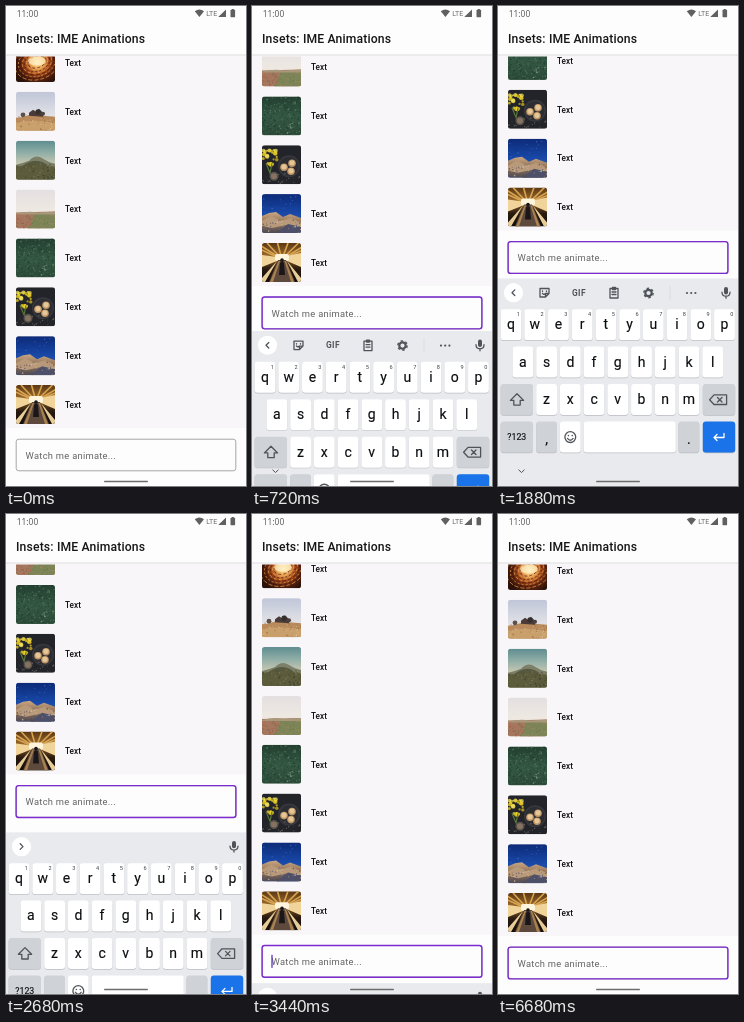
An HTML page that plays this animation: 240 px wide and 480 px high, repeating every 7000 ms.

```html
<!DOCTYPE html>
<html lang="en">
<head>
<meta charset="utf-8">
<title>Insets: IME Animations</title>
<style>
  html, body { margin: 0; width: 100%; height: 100%; overflow: hidden; background: #fefdfe; }
  svg { display: block; width: 100%; height: 100%; }
  text { font-family: Roboto, sans-serif; }
  .title { font-size: 12.2px; font-weight: 500; letter-spacing: .0125em; fill: #161616; }
  .item { font-size: 8.2px; font-weight: 500; fill: #111; }
  .hint { font-size: 9.33px; letter-spacing: .03em; fill: #646464; }
  .clock { font-family: "Open Sans", sans-serif; font-size: 8.4px; font-weight: 500; fill: #505050; }
  .key { font-size: 14px; fill: #0c0d0f; stroke: #0c0d0f; stroke-width: .15; text-anchor: middle; }
  .digit { font-size: 5.6px; fill: #3c4043; text-anchor: middle; }
  .line { fill: none; stroke: #50545a; stroke-width: 1.3; stroke-linecap: round; stroke-linejoin: round; }
</style>
</head>
<body>
<svg id="stage" viewBox="0 0 240 480" xmlns="http://www.w3.org/2000/svg"></svg>
<script>
const LOOP = 7000, STAGE_H = 480, KEYBOARD_H = 207.5, REST_BOTTOM = 470;
const SLIDE = 1425, OPEN_AT = 228, CLOSE_AT = 2515, FOCUS_AT = 80;
const CONTENT_LAG = 17;

let seed = 7;
const random = () => (seed = (seed * 16807) % 2147483647) / 2147483647;

// Shape helpers
const rect = (x, y, w, h, fill, r = 0, extra = '') =>
  `<rect x="${x}" y="${y}" width="${w}" height="${h}" rx="${r}" fill="${fill}" ${extra}/>`;
const circle = (x, y, r, fill, extra = '') => `<circle cx="${x}" cy="${y}" r="${r}" fill="${fill}" ${extra}/>`;
const path = (d, fill, extra = '') => `<path d="${d}" fill="${fill}" ${extra}/>`;
const line = (d, extra = '') => `<path class="line" d="${d}" ${extra}/>`;
const text = (x, y, value, type, extra = '') => `<text x="${x}" y="${y}" class="${type}" ${extra}>${value}</text>`;
const stops = colors => colors.map((c, i) =>
  `<stop offset="${i / (colors.length - 1)}" stop-color="${c}"/>`).join('');
const fade = (id, ...colors) => `<linearGradient id="${id}" x2="0" y2="1">${stops(colors)}</linearGradient>`;
const speckle = (count, x, y, w, h, colors, size = 1) => Array.from({ length: count }, () =>
  circle((x + random() * w).toFixed(1), (y + random() * h).toFixed(1), (size * (.3 + random() * .6)).toFixed(2),
    colors[Math.floor(random() * colors.length)], 'opacity=".7"')).join('');

const defs = `<defs>
  <clipPath id="thumb"><rect width="39" height="39" rx="2.5"/></clipPath>
  <radialGradient id="burst" cx=".55" cy=".5" r=".6">${stops(['#fff3c9', '#f2ae5c', '#a84c1c', '#541f0e', '#2a120a'])}</radialGradient>
  ${fade('haze', '#bfc6d8', '#dcdde4', '#f0ebe6')}
  ${fade('teal', '#5f8d90', '#94b0a8', '#d3cdb4', '#c9c0a4')}
  ${fade('pale', '#e4dfe0', '#eee8e2', '#e9dccb')}
  ${fade('wood', '#233f30', '#345843', '#2b4a38')}
  ${fade('night', '#0d2a78', '#1848a8', '#3c69b0')}
  ${fade('rock', '#c9a684', '#937458', '#4d4a58')}
  ${fade('tunnel', '#5a3714', '#9a6a2c', '#2a1a10', '#120d0a')}
  ${fade('shade', '#d9d8da', '#f8f6f8')}
</defs>`;

const photos = [
  () => rect(0, 0, 39, 39, 'url(#burst)') +
    Array.from({ length: 9 }, (_, i) => `<ellipse cx="21" cy="19" rx="${7 + i * 2}" ry="${4 + i * 1.7}" fill="none"
      stroke="${i % 2 ? '#3a140a' : '#f3a850'}" stroke-width=".9" stroke-dasharray="${2 + i % 3} 2" opacity=".7"
      transform="rotate(-18 21 19)"/>`).join('') +
    `<ellipse cx="21" cy="18" rx="9" ry="4.5" fill="#fff0c4" opacity=".75"/>`,
  () => rect(0, 0, 39, 39, 'url(#haze)') + path('M0 26Q10 25 15 22Q21 20 27 24L39 25V39H0Z', '#b98a5c') +
    path('M0 31Q18 27 39 31V39H0Z', '#c9a06c') +
    path('M13 24V21L17 18L20 20L23 17L27 21V25Z', '#4a3a38') +
    circle(22, 20, 2.6, '#33302f') + circle(27, 22, 2, '#4b403d') + circle(7, 23, 2.4, '#5d5048') +
    speckle(45, 0, 25, 39, 14, ['#94683f', '#dcc096']),
  () => rect(0, 0, 39, 39, 'url(#teal)') + path('M0 24Q8 22 13 20Q20 13 27 18Q33 22 39 23V39H0Z', '#7c8069') +
    path('M4 27Q20 13 35 27Z', '#57593f') + path('M0 26Q20 22 39 26V39H0Z', '#5c5c3c') +
    speckle(80, 0, 23, 39, 16, ['#3f4530', '#86805a', '#333d2a']),
  () => rect(0, 0, 39, 39, 'url(#pale)') + path('M0 23L39 22V39H0Z', '#a5775f') +
    path('M18 24L39 23V39H12Z', '#7d8457') + path('M0 24Q12 21 22 23L39 22V25H0Z', '#a8977a') +
    speckle(45, 0, 25, 17, 14, ['#b8604c', '#80684c']) + speckle(45, 15, 25, 24, 14, ['#657645', '#a58f62']),
  () => rect(0, 0, 39, 39, 'url(#wood)') +
    speckle(260, 0, 0, 39, 39, ['#1b3529', '#446a52', '#5d8068', '#213f30']) +
    speckle(12, 24, 24, 14, 14, ['#8ca58d']),
  () => rect(0, 0, 39, 39, '#23242a') + circle(27, 21, 11, '#37383e') + circle(27, 21, 9.5, '#2c2d33') +
    speckle(28, 1, 4, 14, 16, ['#f3d92c', '#ffee62', '#dcbc1f'], 2.6) +
    path('M4 18L9 30M10 18L8 28', 'none', 'stroke="#59753e" stroke-width="1.2"') +
    [[22, 22], [30, 18], [29, 26]].map(([x, y]) => circle(x, y, 3.8, '#bf9464') + circle(x, y - .5, 2.6, '#e4c698')).join('') +
    circle(12, 31, 4.5, '#55504a') + circle(12, 31, 3, '#857260') + speckle(22, 0, 28, 39, 10, ['#77736a']),
  () => rect(0, 0, 39, 39, 'url(#night)') + speckle(28, 0, 0, 39, 18, ['#4a78c8', '#0c245c'], .8) +
    path('M0 22L7 19L14 18L21 23L28 20L39 24V39H0Z', 'url(#rock)') +
    path('M0 27L9 22L19 27L29 24L39 29V33L24 31L10 34L0 32Z', '#b8997a') + path('M14 39L26 30L39 33V39Z', '#4d5068') +
    speckle(55, 0, 23, 39, 16, ['#dcc2a0', '#5a4a48', '#46527c']),
  () => rect(0, 0, 39, 39, 'url(#tunnel)') +
    [-24, -17, -10, -3, 4, 11, 18, 25].map(d => path(`M${20 + d * 1.5} 0L${20 + d * .3} 13`, 'none',
      'stroke="#d8a452" stroke-width="1.6"')).join('') +
    path('M0 12L15 14V18L0 24ZM39 10L25 13V18L39 24Z', '#f0d49a') +
    rect(13, 11, 14, 7, '#fff4dc', 2) + path('M16 17H24L33 39H7Z', '#5d4a3c') +
    path('M15 18L0 35V39H3ZM25 18L39 35V39H36Z', '#e6cc98') +
    path('M16.5 18L8 39H11L18 18ZM24 18L32 39H29L22.5 18Z', '#a98250') +
    path('M18 20Q20 17 22 20L23 32H17Z', '#1b1718') + circle(20, 17, 1.8, '#1b1718')
];

const items = photos.map((photo, i) => {
  const y = 379 - (7 - i) * 48.86;
  return `<g transform="translate(10 ${y})" clip-path="url(#thumb)">${photo()}</g>` + text(59, y + 22.8, 'Text', 'item');
}).join('');

const content = `<g id="content">${items}
  ${rect(0, 422, 240, 300, '#fefdfe')}
  ${rect(10.2, 433.2, 219.6, 31.6, 'none', 2.5, 'stroke="#a6a6a6"')}
  ${rect(10.1, 433.1, 219.8, 31.8, 'none', 2.5, 'id="focus" stroke="#7b2bd0" stroke-width="1.4"')}
  ${text(19.6, 452.8, 'Watch me animate...', 'hint')}
  ${rect(19.4, 442.5, 1.2, 13, '#4d28b0', 0, 'id="caret"')}
</g>`;

const header = rect(0, 48, 240, 2.5, 'url(#shade)') + rect(0, 0, 240, 48.5, '#fefdfe') +
  text(10, 37, 'Insets: IME Animations', 'title') +
  text(10.8, 11, '11:00', 'clock') +
  path('M188.8 5.2Q193.4 1.6 198 5.2L193.4 11Z', '#606060') +
  text(200.2, 10, 'LTE', '', 'font-size="7" fill="#6c6c6c"') +
  path('M212.5 11V10.8L220 3.5V11Z', '#606060') +
  rect(224.5, 3.8, 4.6, 7.4, '#606060', .6) + rect(225.8, 3, 2, 1.2, '#606060');

// Keyboard, measured from its top edge
const PITCH = 23.72, ROWS = [46.3, 83.6, 121.1, 158.6], GREY = '#cfd2d7';
const cap = (x, w, row, fill = '#fff') => {
  const y = ROWS[row] - 15.5;
  return rect(x, y + .7, w, 31, '#b9bcc1', 3) + rect(x, y, w, 31, fill, 3);
};
const letters = (chars, x0, row) => [...chars].map((c, i) => {
  const x = x0 + i * PITCH;
  return cap(x - 10.4, 20.8, row) + text(x, ROWS[row] + 4.4, c, 'key') +
    (row ? '' : text(x + 7.4, ROWS[row] - 8.4, (i + 1) % 10, 'digit'));
}).join('');

const tools = `<g id="tools">
  ${line('M42 10H51V15L47.5 18.5H42ZM51 15H47.5V18.5M44.5 12.5V13M48.5 12.5V13M44.5 15Q46 16.5 47.5 15')}
  ${text(81, 17, 'GIF', '', 'font-size="8.4" font-weight="700" letter-spacing=".5" text-anchor="middle" fill="#50545a"')}
  ${line('M112 10H120V19.5H112ZM114.5 9H117.5V11H114.5ZM114 13.5H118M114 16H118')}
  ${circle(150.5, 14.5, 3.2, 'none', 'stroke="#50545a" stroke-width="2.2"')}
  ${circle(150.5, 14.5, 4.7, 'none', 'stroke="#50545a" stroke-width="1.4" stroke-dasharray="2.4 2.52"')}
  ${rect(171.6, 7, .8, 15, '#d6d9dd')}
  ${[189, 193.2, 197.4].map(x => circle(x, 14.5, 1.1, '#50545a')).join('')}
</g>`;

const keyboard = `<g id="keyboard">
  ${rect(0, 0, 240, 240, '#e8eaed')}
  ${circle(15.5, 14.2, 9.6, '#fff')}
  ${line('M16.8 11.4L14 14.2L16.8 17', 'id="arrow"')}
  ${tools}
  ${rect(226, 8.5, 4, 7.4, '#50545a', 2)}${line('M224 13.7Q224 17.7 228 17.7Q232 17.7 232 13.7M228 17.7V19.7')}
  ${letters('qwertyuiop', 13, 0)}${letters('asdfghjkl', 24.9, 1)}${letters('zxcvbnm', 48.6, 2)}
  ${cap(2.6, 32.4, 2, GREY)}${line('M19 115.2L25.6 121.9H22.2V126.6H15.8V121.9H12.4Z')}
  ${cap(204.8, 32.4, 2, GREY)}${line('M211.6 121.2L216 116.4H228.6V126H216ZM219.5 119L224 123.5M224 119L219.5 123.5')}
  ${cap(2.6, 32.4, 3, GREY)}${text(18.8, 161.6, '?123', 'key', 'style="font-size:8.8px"')}
  ${cap(38.2, 20.8, 3, GREY)}${text(48.6, 165, ',', 'key')}
  ${cap(61.9, 20.8, 3)}${circle(72.3, 158.6, 5.4, 'none', 'class="line"')}
  ${circle(70.4, 157.1, .8, '#50545a')}${circle(74.2, 157.1, .8, '#50545a')}${line('M69.5 159.9Q72.3 163.6 75.1 159.9')}
  ${cap(85.6, 92.2, 3)}
  ${cap(180.5, 20.8, 3, GREY)}${text(190.9, 165, '.', 'key')}
  ${cap(204.8, 32.4, 3, '#1a73e8')}${line('M226 155V159H216M219 156L216 159L219 162', 'style="stroke:#fff"')}
</g>`;

document.getElementById('stage').innerHTML = defs + rect(0, 0, 240, 480, '#f8f6f8') + content + header + keyboard +
  line('M20.8 464L23.5 466.5L26.2 464', 'id="dismiss" style="stroke-width:1"') +
  rect(98, 474.8, 44, 1.4, '#6c6c6c', .7);

const part = Object.fromEntries(['content', 'focus', 'caret', 'keyboard', 'tools', 'arrow', 'dismiss']
  .map(id => [id, document.getElementById(id)]));
const clamp = v => Math.min(1, Math.max(0, v));

// cubic-bezier(.2, 0, 0, 1), solved by bisection
function ease(x) {
  if (x <= 0) return 0;
  if (x >= 1) return 1;
  let low = 0, high = 1, s;
  for (let i = 0; i < 24; i++) {
    s = (low + high) / 2;
    if (.6 * s * (1 - s) ** 2 + s ** 3 < x) low = s; else high = s;
  }
  return s * s * (3 - 2 * s);
}

const keyboardTop = t =>
  STAGE_H - KEYBOARD_H * (ease((t - OPEN_AT) / SLIDE) - ease((t - CLOSE_AT) / SLIDE));

function draw(t) {
  const lift = Math.max(0, REST_BOTTOM - keyboardTop(t - CONTENT_LAG));
  const collapse = clamp((t - 1900) / 300);
  part.content.setAttribute('transform', `translate(0 ${-lift})`);
  part.keyboard.setAttribute('transform', `translate(0 ${keyboardTop(t)})`);
  part.focus.setAttribute('opacity', clamp((t - FOCUS_AT) / 150));
  part.caret.setAttribute('opacity', t >= 200 && (t - 200) % 1000 < 480 ? 1 : 0);
  part.tools.setAttribute('opacity', 1 - collapse);
  part.arrow.setAttribute('transform', `rotate(${180 * collapse} 15.5 14.2)`);
  part.dismiss.setAttribute('opacity', t > OPEN_AT && t < CLOSE_AT ? 1 : 0);
}

const start = performance.now();
function tick() {
  draw((performance.now() - start) % LOOP);
  requestAnimationFrame(tick);
}
tick();
</script>
</body>
</html>
```
